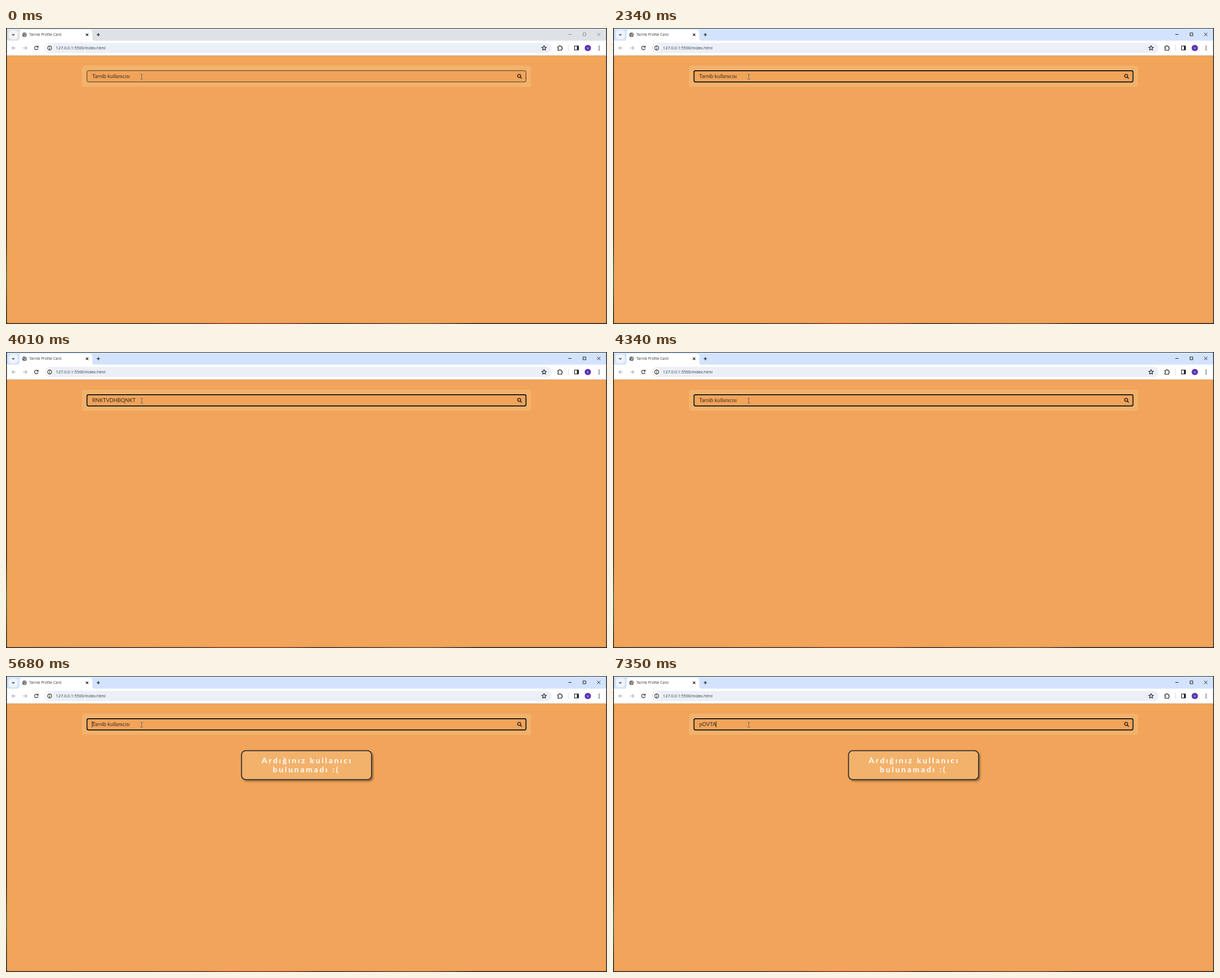
An HTML page for the animation above (8 s loop, 1065 by 526 pixels).

```html
<!DOCTYPE html>
<html lang="tr">
<head>
<meta charset="utf-8">
<title>Profile search</title>
<style>
  html, body { margin: 0; width: 100%; height: 100%; overflow: hidden; background: #f1a45a; }
  svg { display: block; width: 1065px; height: 526px; }
  .ui { font-family: "Open Sans", "Noto Sans", sans-serif; fill: #33363a; }
  .page { font-family: Lato, sans-serif; }
  .line { fill: none; stroke: #1f1f1f; stroke-width: 1.1; }
  .pale { stroke: #a9abae; }
</style>
</head>
<body>
<svg viewBox="0 0 1065 526">
  <defs>
    <linearGradient id="leftEdge" x2="0" y2="1">
      <stop offset="0" stop-color="#23262b"/>
      <stop offset=".7" stop-color="#1d2421"/>
      <stop offset=".83" stop-color="#2f6b4c"/>
      <stop offset="1" stop-color="#16201c"/>
    </linearGradient>
    <linearGradient id="bottomEdge">
      <stop offset="0" stop-color="#2a2420"/>
      <stop offset=".32" stop-color="#4b3328"/>
      <stop offset=".36" stop-color="#8a3322"/>
      <stop offset=".47" stop-color="#7a3526"/>
      <stop offset=".52" stop-color="#37261f"/>
      <stop offset=".7" stop-color="#6b4a38"/>
      <stop offset=".78" stop-color="#1d1b1b"/>
      <stop offset="1" stop-color="#1d1b1b"/>
    </linearGradient>
    <filter id="blur"><feGaussianBlur stdDeviation="1.6"/></filter>
  </defs>

  <!-- desktop edges and page -->
  <rect width="1065" height="526" fill="#2b2d31"/>
  <rect width="2" height="526" fill="url(#leftEdge)"/>
  <rect y="524" width="1065" height="2" fill="url(#bottomEdge)"/>
  <rect x="1.5" y="48" width="1062" height="476.5" fill="#f1a45a"/>

  <!-- tab strip -->
  <rect id="strip" x="1.5" y="1" width="1062" height="23"/>
  <rect id="tabMenu" x="5" y="4" width="16" height="16" rx="5"/>
  <path class="line" d="M10.8 10.8l2.1 2.1 2.1-2.1"/>
  <path fill="#fff" d="M19 23q5 0 5-5V8q0-5 5-5H148q5 0 5 5V18q0 5 5 5z"/>
  <circle cx="32.8" cy="12" r="4" fill="#5b5f64"/>
  <path d="M29.6 10.6l2.6 1.4 1.2 1.6-1 1.8M33.2 8.6l.6 1.6 1.9 .4M34.3 12.4l1.8.6" fill="none" stroke="#fff"/>
  <text class="ui" x="41.2" y="14.4" font-size="6.6">Tarnib Profile Card</text>
  <path class="line" d="M141.6 9.8l4.2 4.2m0-4.2l-4.2 4.2M160.8 11.9h5.6m-2.8-2.8v5.6"/>
  <path id="controls" fill="none" d="M996.5 11.5h5.5M1022.5 8.8h5v5h-5zM1047.6 8.6l5.6 5.6m0-5.6l-5.6 5.6"/>

  <!-- toolbar -->
  <rect x="1.5" y="22.5" width="1062" height="26" fill="#fff"/>
  <path d="M1.5 48.5H1063.5" stroke="#dfe2e6"/>
  <rect x="69" y="26.5" width="898" height="18" rx="9" fill="#ebeff7"/>
  <path class="line pale" d="M17.5 35.5h-7m3.2-3.2l-3.2 3.2 3.2 3.2M30 35.5h7m-3.2-3.2l3.2 3.2-3.2 3.2"/>
  <path class="line" d="M56.3 33.3a3.2 3.2 0 1 0 .6 3.1M57 31.8v2.5h-2.6"/>
  <circle cx="77.5" cy="35.5" r="6.5" fill="#fff"/>
  <circle class="line" cx="77.5" cy="35.5" r="3.6"/>
  <path class="line" d="M77.5 35v2.6M77.5 33.2v1"/>
  <text class="ui" x="88.6" y="38.2" font-size="7.25">127.0.0.1:5500/index.html</text>
  <path class="line" stroke-linejoin="round" d="M953.5 31.3l1.2 2.8 3 .2-2.3 2 .7 3-2.6-1.6-2.6 1.6.7-3-2.3-2 3-.2z"/>
  <path class="line" d="M978 32.7h2.2q0-1.5 1.2-1.5t1.2 1.5h2.2v2.2q1.3 0 1.3 1.2t-1.3 1.2v2.2h-6.8v-2.2q1.4 0 1.4-1.2t-1.4-1.2z"/>
  <path d="M996.5 30v11" stroke="#d3e0f5"/>
  <rect class="line" x="1007.5" y="32" width="7" height="7"/>
  <path d="M1011.7 32h2.8v7h-2.8z" fill="#1f1f1f"/>
  <circle cx="1031" cy="35.5" r="5.6" fill="#5a35b0"/>
  <text class="ui" x="1031" y="37.6" font-size="5.6" text-anchor="middle" style="fill:#fff">V</text>
  <path d="M1051 32.3v.01m0 3.2v.01m0 3.2v.01" stroke="#1f1f1f" stroke-width="1.8" stroke-linecap="round"/>

  <!-- search box -->
  <rect x="134.5" y="67" width="796" height="37.5" rx="4.5" fill="#f3b26b"/>
  <rect id="halo" x="142.6" y="74.9" width="779.8" height="21.7" rx="3.5" fill="none" stroke="#fff" stroke-opacity=".4"/>
  <rect id="field" x="143.5" y="75.8" width="778" height="20" rx="2.5" fill="#f1a45a"/>
  <text id="entry" class="page" x="152.8" y="89" font-size="9.25"></text>
  <rect id="caret" y="80.5" width="1" height="10.5" fill="#111"/>
  <circle class="line" cx="909.3" cy="85.1" r="2.7" style="stroke-width:1.3"/>
  <path class="line" d="M911.3 87.1l2.6 2.6" style="stroke-width:1.5"/>
  <path d="M238.4 82.5h1.6l.5.4.5-.4h1.6M240.5 83v7.4M238.4 90.8h1.6l.5-.4.5.4h1.6" fill="none" stroke="#6a6258" stroke-width=".9"/>

  <!-- not-found card -->
  <g id="card" class="page" font-size="14" font-weight="700" letter-spacing="2.7" fill="#fff">
    <rect x="420" y="135" width="231" height="52.5" rx="7.5" fill="#6b4a2a" opacity=".6" filter="url(#blur)"/>
    <rect x="417.4" y="132.6" width="230.4" height="51.6" rx="7.5" fill="#f3b26b" stroke="#333" stroke-width="1.8"/>
    <text x="453" y="155.4">Ardığınız kullanıcı</text>
    <text x="472.8" y="171.4">bulunamadı :(</text>
  </g>
</svg>
<script>
  const LOOP = 8000, FOCUS = 1000, NOT_FOUND = 4680;
  const PLACEHOLDER = "Tarnib kullanıcısı";
  const FIRST = "RNKTVDHBQNKT", SECOND = "pOVTA";

  // [start ms, typed text, caret shown]
  const steps = [
    [0, "", false], [1000, "", true], [1340, "", false], [2000, "", true], [2340, "", false],
    [2670, FIRST.slice(0, 3), true], [3010, FIRST.slice(0, 7), true],
    [3340, FIRST.slice(0, 10), true], [3670, FIRST, true], [4010, FIRST, false],
    [4340, "", false], [4680, "", true], [5010, "", false], [5680, "", true], [6350, "", false],
    [6680, SECOND.slice(0, 1), true], [7010, SECOND.slice(0, 2), true], [7350, SECOND, true]
  ];

  const $ = id => document.getElementById(id);
  const set = (id, attrs) => {
    for (const name in attrs) $(id).setAttribute(name, attrs[name]);
  };
  const show = (id, on) => set(id, { visibility: on ? "visible" : "hidden" });

  function draw(now) {
    const t = now % LOOP;
    const focused = t >= FOCUS;
    const [, typed, caretOn] = steps.findLast(([start]) => t >= start);

    set("strip", { fill: focused ? "#d3e3fd" : "#dee1e6" });
    set("tabMenu", { fill: focused ? "#eef4fe" : "#f3f4f6" });
    set("controls", { stroke: focused ? "#1f1f1f" : "#8c8f93" });
    set("field", { stroke: focused ? "#0c0c0c" : "#4a3420", "stroke-width": focused ? 1.7 : 1 });
    show("halo", focused);
    show("card", t >= NOT_FOUND);

    $("entry").textContent = typed || PLACEHOLDER;
    set("entry", { fill: typed ? "#33281c" : "#3a2d20" });
    const width = typed ? $("entry").getComputedTextLength() : 0;
    set("caret", { x: 152.4 + width });
    show("caret", caretOn);

    requestAnimationFrame(draw);
  }
  requestAnimationFrame(draw);
</script>
</body>
</html>
```
